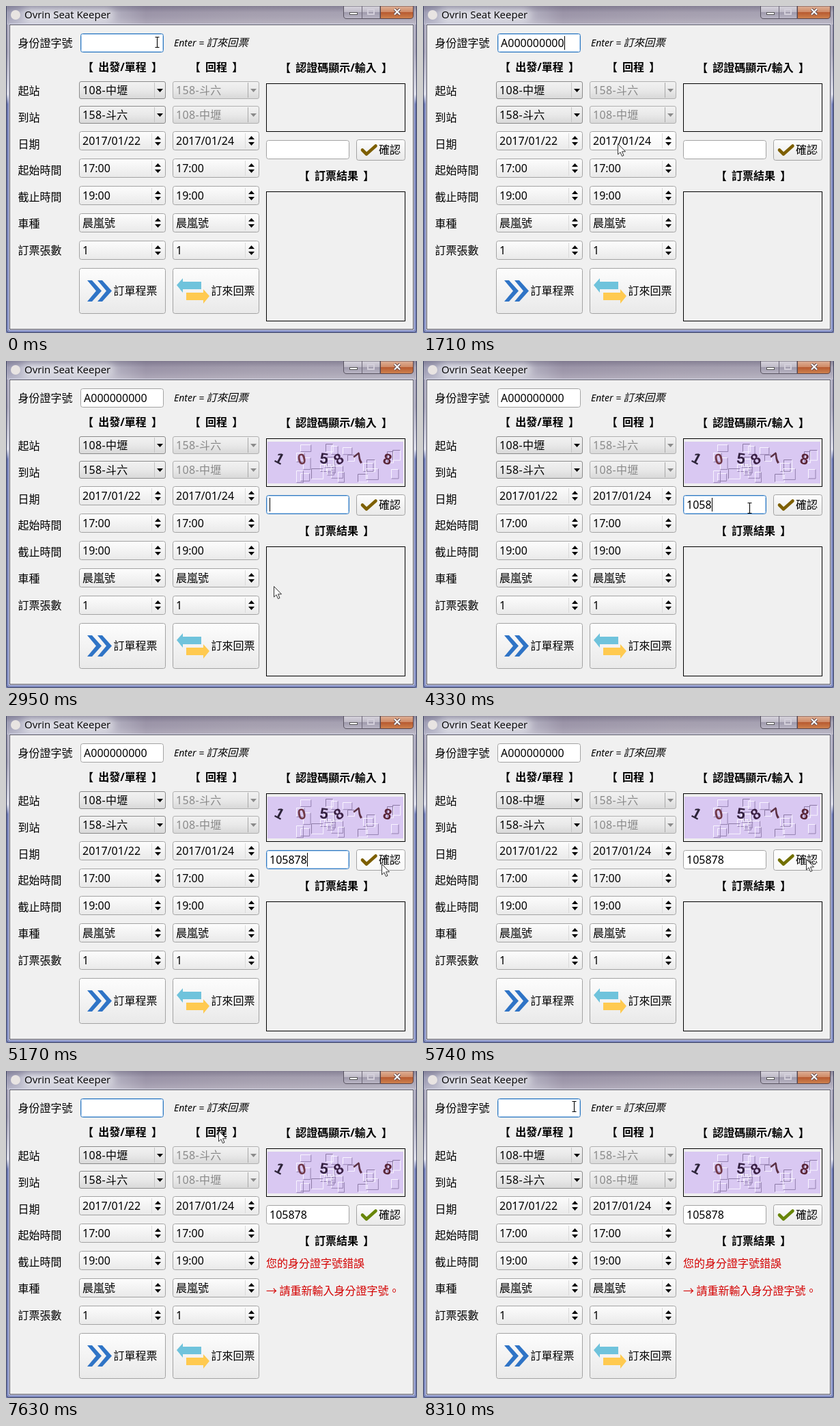
Write an HTML page that moves like this. It is 602x478 px and loops after 8.85 s.

```html
<!DOCTYPE html>
<html lang="zh-Hant">
<head>
<meta charset="utf-8">
<title>Ovrin Seat Keeper</title>
<style>
html, body { margin: 0; width: 100%; height: 100%; overflow: hidden; background: #8d859c; }
svg { display: block; width: 602px; height: 478px; }
text { font: 16px "Noto Sans", "Noto Sans CJK TC", sans-serif; white-space: pre; }
.head { font-weight: 700; text-anchor: middle; word-spacing: 3px; }
.hint { font-size: 14px; font-style: italic; }
.station { letter-spacing: .35px; }
.off { fill: #8a8a8a; }
.err { fill: #d40000; }
</style>
</head>
<body>
<svg id="stage" viewBox="0 0 602 478" xmlns="http://www.w3.org/2000/svg">
  <defs>
    <linearGradient id="bar">
      <stop offset="0" stop-color="#a5a4bb"/><stop offset=".06" stop-color="#c6c7d6"/>
      <stop offset=".24" stop-color="#c2c1cf"/><stop offset=".34" stop-color="#a29bae"/>
      <stop offset=".6" stop-color="#aca6b5"/><stop offset="1" stop-color="#b0acbc"/>
    </linearGradient>
    <linearGradient id="shade" x2="0" y2="1">
      <stop offset="0" stop-color="#4a4460" stop-opacity=".4"/>
      <stop offset=".35" stop-color="#4a4460" stop-opacity=".08"/>
      <stop offset="1" stop-color="#fff" stop-opacity=".18"/>
    </linearGradient>
    <linearGradient id="side" x2="0" y2="1">
      <stop offset="0" stop-color="#a9a5b8"/><stop offset=".14" stop-color="#a3a0b5"/>
      <stop offset=".27" stop-color="#dcdde8"/><stop offset=".3" stop-color="#6f7ab2"/>
      <stop offset="1" stop-color="#808bc0"/>
    </linearGradient>
    <linearGradient id="cap" x2="0" y2="1">
      <stop offset="0" stop-color="#d8d5de"/><stop offset=".48" stop-color="#bfbbc8"/>
      <stop offset=".5" stop-color="#9f9aac"/><stop offset="1" stop-color="#bbb7c6"/>
    </linearGradient>
    <linearGradient id="shut" x2="0" y2="1">
      <stop offset="0" stop-color="#dfb198"/><stop offset=".48" stop-color="#cf8a66"/>
      <stop offset=".5" stop-color="#b75a30"/><stop offset="1" stop-color="#cf8350"/>
    </linearGradient>
    <linearGradient id="combo" x2="0" y2="1">
      <stop offset="0" stop-color="#f2f2f2"/><stop offset=".5" stop-color="#e9e9e9"/>
      <stop offset="1" stop-color="#d8d8d8"/>
    </linearGradient>
    <linearGradient id="soft" x2="0" y2="1">
      <stop offset="0" stop-color="#fdfdfd"/><stop offset="1" stop-color="#e9e9e9"/>
    </linearGradient>
    <linearGradient id="hover" x2="0" y2="1">
      <stop offset="0" stop-color="#fff"/><stop offset="1" stop-color="#f7f7f7"/>
    </linearGradient>
    <filter id="glow" x="-20%" y="-100%" width="140%" height="300%"><feGaussianBlur stdDeviation="6"/></filter>
  </defs>
</svg>
<script>
const LOOP = 8850;
const stage = document.getElementById('stage');

function el(tag, attrs, parent = stage) {
  const node = document.createElementNS('http://www.w3.org/2000/svg', tag);
  for (const k in attrs) node.setAttribute(k, attrs[k]);
  parent.appendChild(node);
  return node;
}
const fillRect = (x, y, w, h, fill, parent) => el('rect', { x, y, width: w, height: h, fill }, parent);
const box = (x, y, w, h, fill, stroke, rx = 0, parent = stage) =>
  el('rect', { x: x + .5, y: y + .5, width: w - 1, height: h - 1, rx, fill, stroke }, parent);
const path = (d, fill, more = {}, parent = stage) => el('path', { d, fill, ...more }, parent);
function text(x, y, str, cls = '', parent = stage) {
  const node = el('text', { x, y, class: cls }, parent);
  node.textContent = str;
  return node;
}
const show = (node, on) => node.setAttribute('visibility', on ? 'visible' : 'hidden');

// Window frame
fillRect(0, 0, 602, 478, 'url(#side)');
fillRect(0, 0, 602, 27, 'url(#bar)');
fillRect(0, 0, 602, 27, 'url(#shade)');
box(0, -4, 602, 482, 'none', '#3f4560', 4);
el('rect', { x: 24, y: 5, width: 134, height: 16, rx: 8, fill: '#fff', opacity: .55, filter: 'url(#glow)' });
el('circle', { cx: 14, cy: 13, r: 7, fill: '#e8e4e2' });
text(27, 18, 'Ovrin Seat Keeper').style.font = '15px "Open Sans", sans-serif';
path('M494.5 0V14Q494.5 18.5 499 18.5H548V0Z', 'url(#cap)', { stroke: '#57525f' });
path('M548.5 0V18.5H592Q596.5 18.5 596.5 14V0Z', 'url(#shut)', { stroke: '#57434a' });
path('M521.5 0V18', 'none', { stroke: '#6d6878' });
box(503, 9, 12, 4, '#fff', '#555');
el('rect', { x: 530, y: 5, width: 9, height: 7, fill: 'none', stroke: '#d3cfda', 'stroke-width': 2 });
const cross = 'M569 4.5L577 12.5M577 4.5L569 12.5';
path(cross, 'none', { stroke: '#5a4449', 'stroke-width': 4 });
path(cross, 'none', { stroke: '#fff', 'stroke-width': 2.2 });
box(4, 26, 594, 448, '#f0f0f0', '#d7d9ea');
box(5, 27, 592, 446, '#f0f0f0', '#55535f');

// Labels
['起站', '到站', '日期', '起始時間', '截止時間', '車種', '訂票張數']
  .forEach((s, i) => text(17.5, Math.round(130 + i * 38.8), s));
text(17.5, 60, '身份證字號');
text(246, 59, 'Enter =', 'hint');
text(293.5, 59, '訂來回票', 'hint').style.fontSize = '15.3px';
text(170.5, 95, '【 出發/單程 】', 'head');
text(308, 95, '【 回程 】', 'head');
text(483.5, 96, '【 認證碼顯示/輸入 】', 'head');
text(484, 254, '【 訂票結果 】', 'head');

// Widgets
const widgets = [];
function widget(x, y, w, h) {
  const node = box(x, y, w, h, 'url(#soft)', '#a3a3a3', 3);
  widgets.push({ x, y, w, h, node });
  return node;
}
function combo(x, y, str, on) {
  box(x, y, 127, 26, 'url(#combo)', on ? '#8b8b8b' : '#b0b0b0', 2.5);
  path(`M${x + 110.5} ${y + 2}v22`, 'none', { stroke: on ? '#c4c4c4' : '#a9a9a9' });
  path(`M${x + 114} ${y + 11}h9l-4.5 5z`, on ? '#000' : '#8a8a8a');
  text(x + 5, y + 19, str, on ? 'station' : 'station off');
}
function spin(x, y, str) {
  widget(x, y, 127, 28);
  path(`M${x + 106.5} ${y + 3}v22`, 'none', { stroke: '#dadada' });
  path(`M${x + 111} ${y + 12}h9l-4.5 -5zM${x + 111} ${y + 16}h9l-4.5 5z`, '#000');
  text(x + 5, y + 20, str);
}
const stations = ['108-中壢', '158-斗六'];
[107, 244].forEach((x, col) => {
  stations.forEach((s, i) => combo(x, 110 + 36 * i, stations[i ^ col], !col));
  [col ? '2017/01/24' : '2017/01/22', '17:00', '19:00', '晨嵐號', '1']
    .forEach((s, i) => spin(x, 183 + 40 * i, s));
});

widget(107, 383, 127, 67);
const bookBtn = widget(244, 383, 127, 67);
const chevron = x => path(`M${x} 401h7l14 15.5l-14 15.5h-7l13 -15.5z`, '#2f74c6');
chevron(119);
chevron(134);
text(157.5, 422, '訂單程票');
path('M250 408l9 -10v5h27v11h-27v5z', '#6fc3dc');
path('M298 424l-9 -10v5h-25v11h25v5z', '#ffca50');
text(300.5, 422, '訂來回票');

function field(x, y) {
  const frame = box(x, y, 122, 28, '#fff', '#a3a3a3', 3);
  const halo = box(x + 1, y + 1, 120, 26, 'none', '#b5d3f0', 2);
  const label = text(x + 5, y + 20, '');
  const caret = fillRect(x, y + 4, 1, 20, '#000');
  return (str, focus, caretX) => {
    show(halo, focus);
    frame.setAttribute('stroke', focus ? '#2f78c0' : '#a3a3a3');
    if (label.textContent !== str) label.textContent = str;
    show(caret, caretX > 0);
    caret.setAttribute('x', caretX);
  };
}
const setId = field(109, 40);
const setCode = field(381, 196);

const okBtn = widget(513, 195, 72, 31);
const tick = path('M522 210.5l6 6l13.5 -12', 'none',
  { 'stroke-width': 4.6, 'stroke-linecap': 'round', 'stroke-linejoin': 'round' });
text(546, 216, '確認');

// Captcha panel
box(381, 113, 204, 71, '#f0f0f0', '#000');
const captcha = el('g', {});
fillRect(383, 118, 199, 61, '#d9c8f2', captcha);
let seed = 29;
const rand = () => (seed = seed * 16807 % 2147483647) / 2147483647;
for (let i = 0; i < 24; i++) {
  const w = 9 + rand() * 9, h = 9 + rand() * 9;
  const x = Math.round(412 + rand() * (169 - w)) + .5, y = Math.round(119 + rand() * (59 - h)) + .5;
  path(`M${x} ${y + h}V${y}H${x + w}`, 'none', { stroke: i % 3 ? '#f8f4ff' : '#8d7ba6' }, captcha);
  path(`M${x} ${y + h}H${x + w}V${y}`, 'none', { stroke: i % 3 ? '#9481b0' : '#f8f4ff' }, captcha);
}
[['1', 401, 28, '#2c2338'], ['0', 433, -12, '#703848'], ['5', 466, 8, '#33203f'],
 ['8', 487, -35, '#3b2145'], ['7', 517, -38, '#5b3044'], ['8', 559, 14, '#5a2537']]
  .forEach(([ch, x, turn, fill], i) => {
    const node = text(0, 8, ch, '', captcha);
    node.setAttribute('transform', `translate(${x} ${142 + i % 2}) rotate(${turn})`);
    node.setAttribute('fill', fill);
    node.style.cssText = 'font: 700 22px "Liberation Sans", sans-serif; text-anchor: middle';
  });

// Result panel
const resultBox = box(381, 271, 204, 190, '#f0f0f0', '#000');
const error = el('g', {});
text(381, 287, '您的身分證字號錯誤', 'err', error);
text(381, 327, '→', 'err', error);
text(400.5, 327, '請重新輸入身分證字號。', 'err', error);

// Pointer
const ring = el('circle', { r: 12, fill: '#58ad58', opacity: .78 });
const arrow = path('M.5 .5V16L4 12.7L6.5 18.5L9 17.4L6.5 11.8H11.5Z', '#fff', { stroke: '#333' });
const beam = path('M-3 -7.5h2.5l.5 .5l.5 -.5h2.5M0 -7V7M-3 7.5h2.5l.5 -.5l.5 .5h2.5', 'none',
  { stroke: '#000', 'stroke-width': 1.1 });

// Each move: [time, x, y]
const moves = [
  [[1570, 221, 53], [1710, 285, 200], [1860, 331, 325], [2100, 351, 401]],
  [[2770, 351, 401], [2960, 395, 325], [3130, 455, 240], [3350, 478, 215]],
  [[4890, 478, 215], [5060, 520, 213], [5220, 560, 216], [5360, 561, 209]],
  [[7410, 561, 209], [7520, 440, 150], [7630, 312, 87], [7770, 252, 64], [8120, 221, 52]]
];
function pointAt(t) {
  let move = moves[0];
  for (const m of moves) if (t >= m[0][0]) move = m;
  const last = move.length - 1;
  if (t <= move[0][0]) return move[0].slice(1);
  if (t >= move[last][0]) return move[last].slice(1);
  const i = move.findIndex(k => k[0] > t) - 1;
  const slope = (j, c) => j <= 0 || j >= last ? 0 :
    (move[j + 1][c] - move[j - 1][c]) / (move[j + 1][0] - move[j - 1][0]);
  const a = move[i], b = move[i + 1], d = b[0] - a[0], p = (t - a[0]) / d, q = 1 - p;
  return [1, 2].map(c => q * q * (1 + 2 * p) * a[c] + p * p * (3 - 2 * p) * b[c]
    + d * (p * q * q * slope(i, c) - p * p * q * slope(i + 1, c)));
}

const idTimes = [700, 860, 1020, 1045, 1045, 1070, 1070, 1095, 1095, 1120];
const codeTimes = [3750, 3870, 3990, 4330, 4490, 4590];
const typed = (times, t) => times.filter(k => k <= t).length;
const between = (t, a, b) => t >= a && t < b;
const inside = (x, y, r) => x >= r.x && x < r.x + r.w && y >= r.y && y < r.y + r.h;
const idArea = { x: 109, y: 40, w: 122, h: 28 };
const codeArea = { x: 381, y: 196, w: 122, h: 28 };

function draw(t) {
  const [x, y] = pointAt(t).map(Math.round);
  const done = t >= 7230;
  const bookDown = between(t, 2240, 2370), okDown = between(t, 5550, 5710);

  const n = done ? 0 : typed(idTimes, t);
  const idCaret = between(t, 700, 2240) ? 115 + n * 9.2 : between(t, 7230, 7600) ? 114 : 0;
  setId('A000000000'.slice(0, n), t < 2240 || done, Math.round(idCaret));

  const m = typed(codeTimes, t);
  const codeOn = between(t, 2630, 5550);
  setCode('105878'.slice(0, m), codeOn, codeOn ? Math.round(386 + m * 9.15) : 0);

  for (const w of widgets) {
    const down = w.node === bookBtn && bookDown || w.node === okBtn && okDown;
    w.node.setAttribute('fill', down ? '#cfcfcf' : inside(x, y, w) ? 'url(#hover)' : 'url(#soft)');
  }
  tick.setAttribute('stroke', done ? '#678507' : t < 5360 ? '#7d5f00' : '#727000');

  show(captcha, t >= 2630);
  show(resultBox, !done);
  show(error, done);

  const overText = inside(x, y, idArea) || inside(x, y, codeArea);
  show(beam, overText);
  show(arrow, !overText);
  (overText ? beam : arrow).setAttribute('transform', `translate(${x + (overText ? .5 : 0)} ${y})`);
  show(ring, between(t, 220, 380) || bookDown || okDown || between(t, 8280, 8310));
  ring.setAttribute('cx', x - (overText ? 2 : 1));
  ring.setAttribute('cy', y);
}

const start = performance.now();
function tickFrame() {
  draw((performance.now() - start) % LOOP);
  requestAnimationFrame(tickFrame);
}
tickFrame();
</script>
</body>
</html>
```
